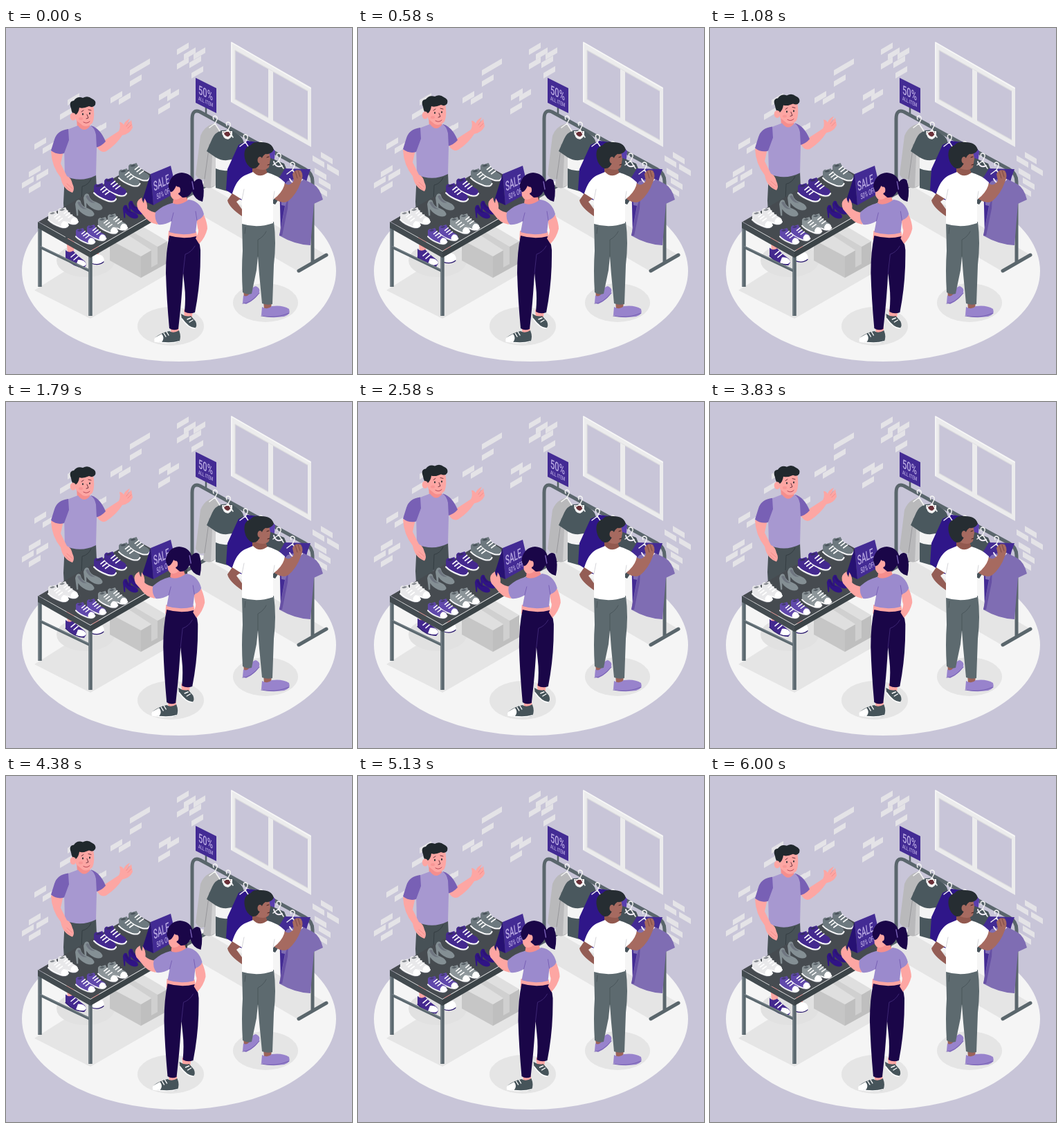
Animation, 500 px wide and 500 px high, one loop 6.04 s. Source, as an HTML page:

```html
<!DOCTYPE html>
<html lang="en">
<head>
<meta charset="utf-8">
<title>Shoe and clothes sale</title>
<style>
html, body { margin: 0; width: 100%; height: 100%; overflow: hidden; background: #c8c5d8; }
svg { display: block; width: 100vw; height: 100vh; }
text { font-family: Roboto, "Liberation Sans", sans-serif; font-weight: 500; fill: #b9a9e2; }
.line { fill: none; stroke-linecap: round; stroke-linejoin: round; }
</style>
</head>
<body>
<svg viewBox="0 0 500 500">
  <defs>
    <g id="sneaker">
      <path d="M1 4Q3 0 6 2L12 0Q15 8 24 13Q31 16 30 21Q28 26 20 24Q6 19 1 13Z" fill="currentColor"/>
      <path d="M3 4Q7 7 11 3L8 2Z" fill="#28303a" opacity=".5"/>
      <path class="line" d="M1 13Q6 19 19 23.500Q28 26 30 21" stroke="#fff" stroke-width="2"/>
      <path class="line" d="M10 9L15 5M12.500 12L18 8M16 15L21.500 11" stroke="#fff" stroke-width="1.6"/>
      <path class="line" d="M1 14.500Q7 20.500 20 25Q28 27 30 22.500" stroke="#777b86" stroke-width=".5"/>
    </g>
    <g id="capped">
      <use href="#sneaker"/>
      <path d="M23 15Q30 15 30 21Q28 26 20 23.500Q18 19 23 15Z" fill="#fff"/>
    </g>
    <g id="heel">
      <path d="M1 8Q3 0 8 3Q10 12 19 14Q28 18 27 23Q24 27 16 24Q9 21 5 15L5 24H3Z" fill="currentColor"/>
      <path d="M4 6Q7 3 8 6Q11 13 17 15Q8 16 4 6Z" fill="#1e1838" opacity=".22"/>
    </g>
    <g id="hanger" class="line" stroke="#f4f4f4" stroke-width="1.5">
      <path d="M-2-9Q-4-14 0-14Q4-13 3-9L0-3L-8 3M0-3L7 8"/>
    </g>
  </defs>

  <!-- room -->
  <path id="bricks" fill="#e4e3e7"/>
  <ellipse cx="250" cy="351" rx="227" ry="131" fill="#f5f5f5"/>
  <g fill="#e5e5e5">
    <path d="M41 379L122 420L262 339L180 292Z"/>
    <path d="M249 251L290 227L463 328L423 352Z"/>
    <ellipse cx="115" cy="336" rx="42" ry="24" fill="#e1e1e1"/>
    <ellipse cx="238" cy="431" rx="48" ry="28"/>
    <ellipse cx="375" cy="397" rx="47" ry="28"/>
  </g>
  <path d="M325 20L441 86V172L325 107ZM331 32V103L436 162V91Z" fill="#ececed" fill-rule="evenodd"/>
  <path class="line" d="M326 106V21L440 87" stroke="#f7f7f7" stroke-width="1.5"/>
  <path class="line" d="M331 103V32L436 91M331 103L436 162" stroke="#dededf" stroke-width="1.2"/>
  <path d="M379 59L386 63V135L379 131Z" fill="#ececed"/>

  <!-- clothes rack -->
  <path d="M289 110V127" stroke="#566268" stroke-width="2.5"/>
  <path d="M274 72L304 87V123L274 108Z" fill="#432b94"/>
  <text transform="matrix(.62 .3 0 1 278 95)" font-size="18">50%</text>
  <text transform="matrix(.62 .3 0 1 278 104)" font-size="8">ALL ITEM</text>
  <path class="line" d="M269 239V131Q269 117 280 121L432 204Q443 210 443 222V339M249 250L290 227M423 351L463 328" stroke="#5a666c" stroke-width="5"/>
  <path d="M301 138Q286 142 281 156L274 212Q280 222 286 218L285 229Q296 235 304 226L311 150Z" fill="#b9b9bb"/>
  <path d="M300 140L308 147L298 185L296 230L303 227L310 180L313 150Z" fill="#d0d0d1"/>
  <path class="line" d="M287 218L294 168" stroke="#97979b"/>
  <path d="M311 148Q302 151 298 160L290 178L303 187V231L327 238L334 188L344 180Q347 163 337 155L325 147Z" fill="#4a585e"/>
  <path d="M303 187Q316 195 332 188L330 204Q315 209 303 203Z" fill="#f4f4f4"/>
  <path d="M312 149Q313 161 321 161Q328 158 327 149Z" fill="#f4f4f4"/>
  <path d="M314 150Q316 157 321 157Q325 155 325 150Z" fill="#6a3038"/>
  <path d="M349 163L336 169L320 204L318 234L331 243L335 224V247L353 252L382 211L388 180L376 167Z" fill="#2f1689"/>
  <path d="M360 164Q380 165 389 178L386 207L366 204Z" fill="#5a3fae"/>
  <path d="M383 188Q371 192 368 207V247L389 255L412 220L402 196Z" fill="#465259"/>
  <path d="M403 203L395 216L397 300L412 306L436 215L440 204Z" fill="#432b94"/>
  <path d="M407 221Q399 228 397 240L398 256L403 257L395 300Q417 313 440 314L445 254L458 248Q454 231 443 225L425 216Z" fill="#7f6db3"/>
  <path d="M404 256L408 243L407 261L399 300L395 300Z" fill="#6650a4"/>
  <path class="line" d="M387 193Q390 203 399 199M410 218Q416 230 428 219" stroke="#f0eaf5" stroke-width="2"/>
  <use href="#hanger" x="302" y="141"/>
  <use href="#hanger" x="321" y="150"/>
  <use href="#hanger" x="346" y="168"/>
  <use href="#hanger" x="368" y="178"/>
  <use href="#hanger" x="394" y="195"/>
  <use href="#hanger" x="414" y="208"/>

  <!-- shopper at the rack -->
  <g>
    <path d="M343 378L354 377L353 390L344 389ZM372 393H384L383 407L373 407Z" fill="#9b6259"/>
    <path d="M342 397L343 386Q347 390 352 384Q355 374 361 373Q368 376 366 382Q360 393 347 399Z" fill="#9883cc"/>
    <path d="M370 403Q378 408 384 402Q400 400 409 406Q412 414 402 417Q380 420 369 415Z" fill="#9883cc"/>
    <path class="line" d="M342 398Q354 398 366 383M369 416Q390 420 409 412" stroke="#7862b4" stroke-width="1.2"/>
    <path d="M341 280Q363 288 387 280Q391 310 387 342L385 399Q377 401 370 398L366 356L364 330L362 350Q358 369 355 384Q348 386 342 382Q340 350 342 322Z" fill="#5d6a6f"/>
    <path class="line" d="M364 330L364 306Q372 302 376 294M346 288L345 297" stroke="#4a565b"/>
    <path d="M329 236L320 249Q322 259 341 272V262L333 251L341 245Z" fill="#945d55"/>
    <path d="M389 242L402 223Q408 231 416 221L414 211Q418 203 426 206Q431 213 426 223Q420 240 408 250Q400 255 388 247Z" fill="#a66a60"/>
    <path class="line" d="M418 207L421 217M422 206L425 215" stroke="#7d4944"/>
    <path d="M356 196L374 198L378 211Q366 221 356 209Z" fill="#92594f"/>
    <path d="M357 208Q366 218 378 209Q393 213 403 223Q402 233 392 243L386 248V282Q363 290 341 283V248L327 239Q333 219 345 213Z" fill="#fff"/>
    <path class="line" d="M341 248L344 233M386 248L388 236" stroke="#d6d6da"/>
    <path d="M361 178L380 177L382 189L380 201Q374 208 362 203Z" fill="#a66a60"/>
    <path d="M345 188Q342 173 354 169Q358 163 369 165Q384 165 387 176Q383 183 375 182Q370 185 368 193Q364 204 356 203Q347 199 345 188Z" fill="#262d32"/>
    <ellipse cx="367" cy="191" rx="3.5" ry="5" fill="#a66a60"/>
    <path class="line" d="M377 187L380 186M378 198L381 197" stroke="#42201e"/>
  </g>

  <!-- boxes below the table -->
  <path d="M150 306L191 283L233 308L195 330Z" fill="#dfdfdf"/>
  <path d="M150 306L195 330V361L150 336Z" fill="#c6c6c6"/>
  <path d="M195 330L233 308V340L195 361Z" fill="#bfbfbf"/>
  <path d="M170 295L177 291L219 316V341L210 346V321Z" fill="#d0d0d0"/>

  <g id="seller">
    <path d="M87 304H99L98 326L89 324ZM122 304H134V330L125 330Z" fill="#fda6a3"/>
    <path d="M86 321Q91 326 97 322Q105 331 114 337Q118 343 113 346Q102 347 86 333Z" fill="#44298f"/>
    <path d="M104 335Q113 334 116 341Q114 347 101 343ZM124 328Q132 325 139 329Q144 335 140 339Q132 344 123 339Z" fill="#fff"/>
    <path class="line" d="M86 333Q99 346 113 346M123 340Q134 344 141 338" stroke="#28176c" stroke-width="1.2"/>
    <path class="line" d="M94 331L100 326M98 335L104 330" stroke="#fff" stroke-width="1.6"/>
    <path d="M85 211Q108 221 130 211L134 304H121L109 250L100 304H86L83 253Z" fill="#475156"/>
    <path class="line" d="M109 253L110 229Q119 227 123 218" stroke="#343d42"/>
    <path d="M131 171Q137 182 145 178Q160 168 168 155Q179 153 183 144L181 133Q177 139 174 141L179 131Q172 134 170 140Q168 136 164 136Q166 144 163 149L143 162Z" fill="#fda6a3"/>
    <path class="line" d="M174 142L178 136M176 145L181 140" stroke="#ee8584" stroke-width=".8"/>
    <path d="M123 141Q136 145 144 164Q138 171 129 173L124 160Z" fill="#7860b5"/>
    <path d="M102 130H119L122 145Q112 153 103 144Z" fill="#f58e8d"/>
    <path d="M88 147L104 141Q113 153 122 141Q128 144 130 154L131 174L130 213Q108 224 85 214L84 172Z" fill="#a798d0"/>
    <path d="M65 178Q66 200 79 216Q82 233 96 238Q100 233 96 225Q94 216 88 214L79 196L83 178Z" fill="#fda6a3"/>
    <path class="line" d="M86 228L93 235M88 225L96 232" stroke="#ee8584" stroke-width=".8"/>
    <path d="M90 146Q74 148 70 161L65 177Q74 184 84 181L91 162Z" fill="#7860b5"/>
    <g transform="translate(-1 0)">
      <path d="M102 113L127 111Q130 128 126 137Q120 144 112 141L102 133Z" fill="#fda6a3"/>
      <path d="M95 116Q91 106 99 105Q104 98 112 101Q119 97 125 102Q132 105 130 111Q127 116 121 113Q112 117 107 115Q106 123 101 126Q96 124 95 116Z" fill="#20282d"/>
      <ellipse cx="98" cy="128" rx="4.3" ry="5.5" fill="#fda6a3"/>
      <g class="line" stroke="#6e3440" stroke-width="1">
        <path d="M110 121L113 119M120 118L124 119M118 125L120 130L117 131"/>
        <path d="M113 136Q118 139 122 135" stroke="#b74655"/>
        <path d="M112 124V125M122 123V124" stroke="#20282d" stroke-width="1.8"/>
      </g>
      <ellipse cx="109" cy="131" rx="3" ry="2" fill="#f58e8d" opacity=".6"/>
    </g>
  </g>

  <!-- table -->
  <g class="line" stroke="#5a676e">
    <path d="M50 317L121 351" stroke-width="4"/>
    <path d="M49 288V374M122 329V416" stroke-width="5.5" stroke-linecap="butt"/>
    <path d="M47.500 290V373M120.500 332V415M50 315.500L119 349" stroke="#77838a" stroke-width="1.2"/>
  </g>
  <path d="M47 280L187 199L262 241L122 322Z" fill="#464b50"/>
  <path d="M46 280L122 323V332L46 289Z" fill="#434b50"/>
  <path d="M122 323L262 242V251L122 332Z" fill="#3b4347"/>
  <g id="goods"></g>
  <path d="M209 211L197 249L213 256Z" fill="#271173"/>
  <path d="M209 211L238 199L247 237L213 256Z" fill="#432b94"/>
  <text transform="matrix(.5 -.26 .12 1 214 236)" font-size="19">SALE</text>
  <text transform="matrix(.5 -.26 .12 1 218 248)" font-size="11">50% OFF</text>

  <g id="shopper">
    <path d="M257 407L270 408L268 424L258 420ZM237 429L249 429L250 443L239 444Z" fill="#fda6a3"/>
    <path d="M253 413Q260 418 267 416L274 424Q277 431 273 434Q264 434 254 420Z" fill="#46545a"/>
    <path d="M216 447Q225 440 236 438Q242 442 250 437Q254 447 250 454Q235 457 215 453Z" fill="#46545a"/>
    <path d="M216 447L225 442Q230 448 225 454L215 453Q213 450 216 447Z" fill="#fff"/>
    <path class="line" d="M215 453Q237 457 250 453M254 420Q264 434 273 434" stroke="#fff" stroke-width="1.6"/>
    <path class="line" d="M228 441L231 446M232 439L235 444M262 421L267 419M265 425L270 422" stroke="#fff" stroke-width="1.4"/>
    <path d="M235 293L275 294L277 306L234 306Z" fill="#fda6a3"/>
    <path d="M236 300Q256 306 275 301Q282 313 281 328Q281 362 276 394L273 411Q265 414 258 410Q260 390 258 373L256 354Q254 387 252 407L249 435Q242 438 236 434Q232 390 231 354Q231 323 236 300Z" fill="#1a0648"/>
    <path class="line" d="M256 354L259 327Q268 324 273 315" stroke="#3d2674"/>
    <path d="M275 275L286 270Q291 282 291 290Q288 303 279 312L274 304Q280 294 277 289Z" fill="#fda6a3"/>
    <path d="M219 284Q206 282 198 270L191 262Q187 253 192 248L196 245Q197 251 199 253L200 246Q205 253 204 261Q209 266 219 267Z" fill="#fda6a3"/>
    <path d="M243 240L260 242L264 253Q251 261 241 253Z" fill="#f58e8d"/>
    <path d="M240 253Q251 258 264 248Q281 250 286 269Q284 275 276 278L274 296Q255 301 236 295L239 279Q230 285 220 284Q214 276 216 266Q227 256 240 253Z" fill="#9b8acd"/>
    <path class="line" d="M239 279L242 267M276 278L274 265" stroke="#7860b5"/>
    <path d="M238 224L250 222L254 243Q249 250 241 247Q236 242 238 235Z" fill="#fda6a3"/>
    <path d="M235 226Q239 210 254 209Q268 210 272 222Q278 215 283 220Q288 234 284 251Q273 249 269 236Q264 246 255 245L249 240Q252 231 246 228Q242 237 238 237Q234 231 235 226Z" fill="#1a0648"/>
    <path class="line" d="M269 222L271 233" stroke="#7860b5" stroke-width="1.4"/>
    <ellipse cx="249" cy="234" rx="3" ry="4.500" fill="#fda6a3"/>
  </g>
</svg>
<script>
const LOOP = 6040;
const byId = id => document.getElementById(id);

// Wall bricks: each pair is the upper left corner.
const leftWall = [[247,31],[257,38],[271,38],[247,52],[265,50],[268,65], [191,54],[179,61],[179,77],
  [151,101],[163,103], [221,97],[233,98],[220,117], [78,125],[89,104],[99,111],[120,150],[128,146],
  [41,168],[53,174], [33,208],[23,224],[44,213],[33,231]];
const rightWall = [[455,179],[443,184],[464,196],[446,202],[452,216],[447,226]];
const brick = rise => ([x, y]) => `M${x} ${y}l17 ${rise}v8l-17 ${-rise}z`;
byId("bricks").setAttribute("d", leftWall.map(brick(-10)).join("") + rightWall.map(brick(10)).join(""));

const pair = (shape, x, y, color, scale, dx = 14, dy = -5) =>
  [[x + dx, y + dy], [x, y]].map(([px, py]) =>
    `<use href="#${shape}" color="${color}" transform="translate(${px} ${py}) scale(${scale})"/>`).join("");
byId("goods").innerHTML =
  pair("sneaker", 162, 203, "#6d797f", 1.05, 14, -8) +
  pair("sneaker", 126, 224, "#44298f", 1.1, 15, -8) +
  pair("heel", 99, 246, "#848f94", 1.05, 12, -9) +
  pair("heel", 168, 254, "#301485", .85, 8, -6) +
  pair("capped", 60, 264, "#e8e8ea", 1) +
  pair("capped", 132, 273, "#8c9599", .98) +
  pair("capped", 100, 289, "#6048ab", .95, 16);

// Horizontal sway in pixels at every tenth of the loop.
const sway = [0, -1, 2, -4, 4, -4, 4, -4, 2, -1, 0];

function draw(now) {
  const phase = (now % LOOP) / LOOP;
  const step = Math.floor(phase * 10);
  const x = sway[step] + (sway[step + 1] - sway[step]) * (phase * 10 - step);
  const y = -10 * (1 - Math.abs(2 * phase - 1));
  byId("shopper").setAttribute("transform", `translate(${x} 0)`);
  byId("seller").setAttribute("transform", `translate(0 ${y})`);
}

let start;
function tick(now) {
  start ??= now;
  draw(now - start);
  requestAnimationFrame(tick);
}
draw(0);
requestAnimationFrame(tick);
</script>
</body>
</html>
```
